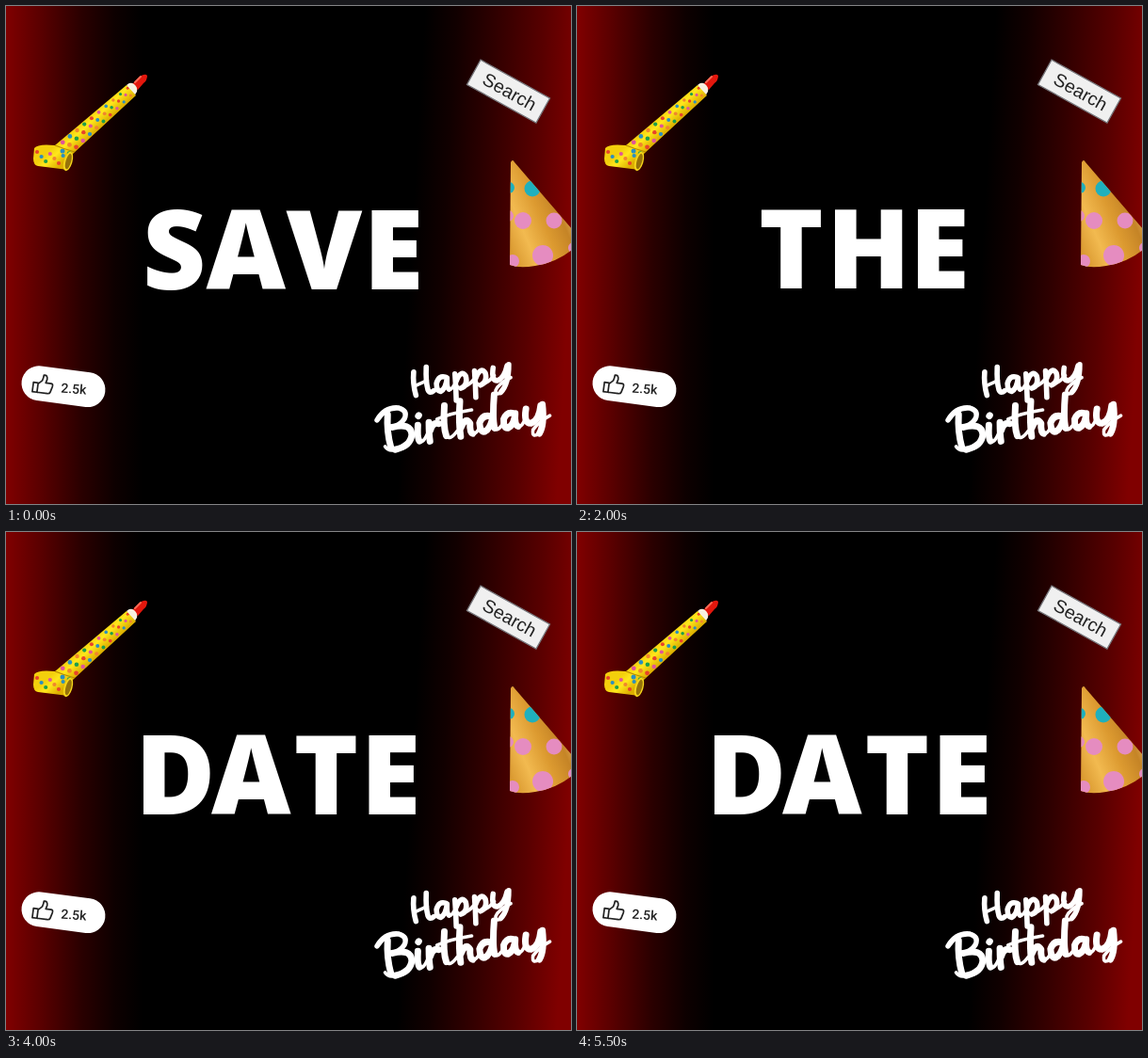
Animation, 600 px wide and 529 px high, one loop 6000 ms. Source, as an HTML page:

```html
<!DOCTYPE html>
<html lang="en">
<head>
<meta charset="utf-8">
<title>Save the date</title>
<style>
  html, body { margin: 0; width: 100%; height: 100%; overflow: hidden; background: #000; }
  svg { display: block; width: 100%; height: 100%; }
  #word { font: 800 116.5px "Open Sans", "Noto Sans", sans-serif; fill: #fff; }
  .script path { fill: none; stroke: #fff; stroke-linecap: round; stroke-linejoin: round; }
  .script .thin { stroke-width: 3.6; }
</style>
</head>
<body>
<svg viewBox="0 0 600 529" preserveAspectRatio="none">
  <defs>
    <linearGradient id="leftGlow" gradientUnits="userSpaceOnUse" x1="0" y1="0" x2="145" y2="0">
      <stop offset="0" stop-color="#800000"/>
      <stop offset=".25" stop-color="#5a0000"/>
      <stop offset=".55" stop-color="#2a0000"/>
      <stop offset=".8" stop-color="#0d0000"/>
      <stop offset="1" stop-color="#000"/>
    </linearGradient>
    <linearGradient id="rightGlow" gradientUnits="userSpaceOnUse" x1="445" y1="0" x2="614.5" y2="9.7">
      <stop offset="0" stop-color="#000"/>
      <stop offset=".2" stop-color="#110000"/>
      <stop offset=".45" stop-color="#300000"/>
      <stop offset=".75" stop-color="#580000"/>
      <stop offset="1" stop-color="#800000"/>
    </linearGradient>
    <linearGradient id="cone" gradientUnits="userSpaceOnUse" x1="533" y1="250" x2="604" y2="220">
      <stop offset="0" stop-color="#dc9c33"/>
      <stop offset=".25" stop-color="#f2ba50"/>
      <stop offset=".55" stop-color="#dc9a30"/>
      <stop offset=".8" stop-color="#c58426"/>
      <stop offset="1" stop-color="#e9b765"/>
    </linearGradient>
    <linearGradient id="tube" gradientUnits="userSpaceOnUse" x1="91" y1="112" x2="104" y2="126">
      <stop offset="0" stop-color="#f3cf0c"/>
      <stop offset=".4" stop-color="#ffe71c"/>
      <stop offset="1" stop-color="#dcae00"/>
    </linearGradient>
    <clipPath id="coneClip"><path id="coneShape" d="M536 166Q538 162 540 166L602 238V258Q586 272 562 276Q545 279 535 275Z"/></clipPath>
    <clipPath id="tubeClip"><path id="tubeShape" d="M128 84L138 95L71 157L66 174L34 170Q29 169 29 162L30 151Q34 146 52 148Z"/></clipPath>
  </defs>

  <rect width="145" height="529" fill="url(#leftGlow)"/>
  <rect x="410" width="190" height="529" fill="url(#rightGlow)"/>

  <g id="blower">
    <path d="M133 84L142 75Q148 71 150 74Q150 79 146 82L140 89Z" fill="#e3170d"/>
    <path d="M137 81L143 75" stroke="#ff6a55" stroke-width="2" stroke-linecap="round"/>
    <path d="M128 84Q132 80 136 83Q140 86 139 91L136 96Z" fill="#f6f0e0"/>
    <use href="#tubeShape" fill="url(#tube)"/>
    <g clip-path="url(#tubeClip)">
      <g id="specks"></g>
      <path d="M52 148Q62 152 73 155" fill="none" stroke="#b88a00" stroke-width="1.2"/>
    </g>
    <ellipse cx="66" cy="165" rx="4.5" ry="10.5" fill="#f5d51a" transform="rotate(16 66 165)"/>
    <ellipse cx="66.3" cy="165" rx="2.8" ry="8.5" fill="#96720a" transform="rotate(16 66 165)"/>
  </g>

  <g transform="translate(533.5 90.7) rotate(29)">
    <rect x="-42" y="-15" width="84" height="30" fill="#f0f0f0" stroke="#77777c" stroke-width="1.3"/>
    <text x="-29.500" y="6.500" font-family="'Liberation Sans', Arial, sans-serif" font-size="19.500" fill="#222">Search</text>
  </g>

  <use href="#coneShape" fill="url(#cone)"/>
  <g id="dots" clip-path="url(#coneClip)"></g>

  <rect x="16.3" y="385.7" width="89.4" height="37" rx="18.5" fill="#fff" transform="rotate(7.5 61 404)"/>
  <g transform="translate(39 402) rotate(7.5)" fill="none" stroke="#222" stroke-width="1.7" stroke-linejoin="round">
    <path d="M-10 -1H-5V9H-10ZM-5 0L-1 -4Q0 -7 0 -10Q4 -11 4 -6L3 -2H9Q11 -2 10.5 1L9 7Q8.5 9 6 9H-5"/>
  </g>
  <text transform="translate(58 410.500) rotate(4.500)" font-family="Roboto, 'Open Sans', sans-serif" font-size="14" font-weight="500" fill="#222">2.5k</text>

  <g class="script" role="img" aria-label="Happy Birthday">
    <g transform="translate(433 415) rotate(-9)" stroke-width="5.6">
      <path d="M4 -26Q1 -14 2.5 -1M18 -29Q15 -14 16 -5Q17 0 22 -3"/>
      <path class="thin" d="M3 -11Q10 -13 17 -15"/>
      <path d="M37 -15Q30 -19 26 -10Q25 -2 29 -1Q35 -3 38 -14Q36 -4 38 -2"/>
      <path class="thin" d="M38 -2Q40 0 45 -6"/>
      <g id="pp"><path d="M47 -17Q46 -4 44 11M47 -9Q54 -21 58 -13Q59 -3 51 -1"/><path class="thin" d="M51 -1Q49 -1 48 -3M55 -2Q62 -4 67 -9"/></g>
      <use href="#pp" x="21"/>
      <path d="M88 -17Q84 -4 90 -3Q98 -4 103 -17M105 -18Q102 2 92 10"/>
      <path class="thin" d="M92 10Q86 13 87 7Q90 1 105 -4"/>
    </g>
    <g transform="translate(402 471) rotate(-9)" stroke-width="7">
      <path d="M9 -36Q5 -18 7 -1M12 -22Q32 -24 31 -11Q28 1 11 2"/>
      <path d="M-3 -32Q8 -45 22 -41Q31 -37 26 -29Q21 -23 11 -22" stroke-width="5.5"/>
      <path class="thin" d="M11 2Q4 3 1 -3"/>
      <path d="M39 -20Q36 -6 38 -3M41.5 -30L41 -29.5"/>
      <path class="thin" d="M38 -3Q41 1 48 -10"/>
      <path d="M51 -21Q49 -8 49 -1M51 -12Q55 -21 61 -18"/>
      <path d="M70 -36Q65 -14 67 -4"/>
      <path class="thin" d="M67 -4Q70 2 79 -7M60 -23Q75 -27 98 -27"/>
      <path d="M87 -38Q82 -16 82 -1M83 -9Q91 -22 94 -13Q92 -4 95 -2"/>
      <path class="thin" d="M95 -2Q98 0 104 -8"/>
      <path d="M117 -17Q109 -21 104 -12Q103 -2 108 -2Q115 -4 119 -17M124 -39Q118 -14 119 -4"/>
      <path class="thin" d="M119 -4Q121 1 129 -8"/>
      <path d="M142 -16Q135 -20 130 -12Q128 -2 133 -2Q140 -4 143 -16Q140 -4 144 -2"/>
      <path class="thin" d="M144 -2Q148 0 153 -10"/>
      <path d="M155 -19Q150 -4 158 -3Q167 -5 171 -20M173 -21Q172 1 165 9"/>
      <path class="thin" d="M165 9Q156 13 159 4Q167 -4 179 -8"/>
    </g>
  </g>

  <text id="word"></text>
</svg>
<script>
const BEAT = 500, LOOP = 6000;
// x holds the start of each letter.
const words = [
  { text: "SAVE", x: "145 212.5 297.5 379.5", y: 301 },
  { text: "THE", x: "193 265 353", y: 300 },
  { text: "DATE", x: "137 218 305.5 376.5", y: 300 }
];
const byId = id => document.getElementById(id);

function addDot(group, cx, cy, r, fill) {
  const dot = document.createElementNS("http://www.w3.org/2000/svg", "circle");
  Object.entries({ cx, cy, r, fill }).forEach(([k, v]) => dot.setAttribute(k, v));
  byId(group).append(dot);
}

const pink = "#e58cc0", teal = "#1fb0bd";
[
  [534, 193, 6, teal], [559, 194, 8.5, teal], [549, 228, 9, pink], [533, 223, 6, pink],
  [582, 228, 8.5, pink], [570, 265, 11, pink], [538, 271, 7, pink], [603, 257, 6, pink]
].forEach(d => addDot("dots", ...d));

// Confetti specks run in three rows down the tube and onto the roll.
const tints = ["#e8442a", "#1f9e4b", "#f0862d", "#2b8fc0", "#e0559a"];
for (let i = 0; i < 30; i++) {
  const u = i / 29, side = (i * 2 % 3 - 1) * (4 + 3 * u);
  addDot("specks", 132 - 72 * u + side * .7, 90 + 64 * u + side * .7, 1.5 + u, tints[i * 2 % 5]);
}
for (let i = 0; i < 7; i++) addDot("specks", 33 + i * 4.6, 155 + i * 5 % 13, 2.1, tints[i * 3 % 5]);

let shown;
function draw(ms) {
  const next = words[Math.floor(ms % LOOP / BEAT) % words.length];
  if (next === shown) return;
  shown = next;
  const el = byId("word");
  el.textContent = next.text;
  el.setAttribute("x", next.x);
  el.setAttribute("y", next.y);
}

const start = performance.now();
function tick() {
  draw(performance.now() - start);
  requestAnimationFrame(tick);
}
tick();
</script>
</body>
</html>
```
